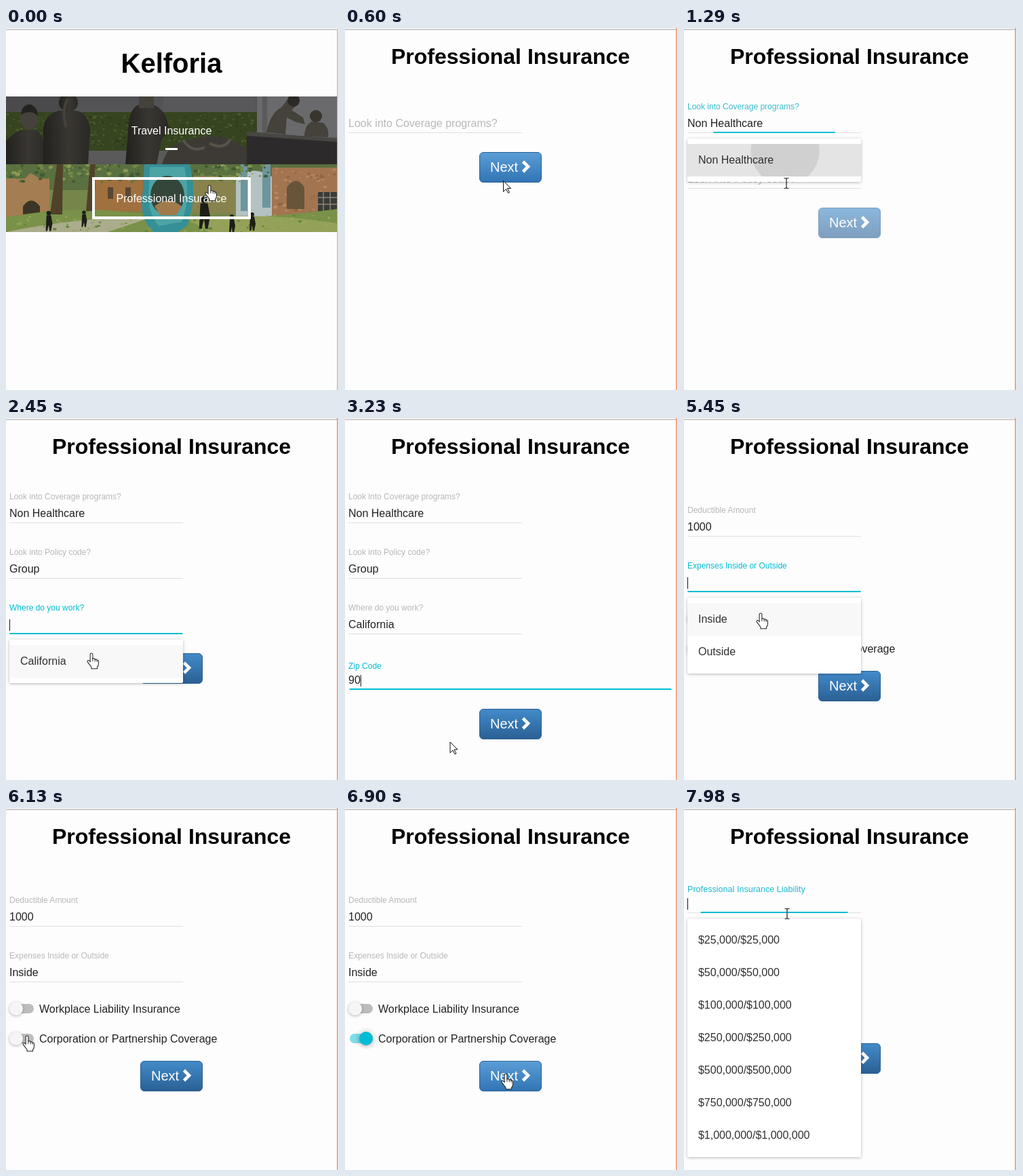
Animation of 491 by 534 pixels, one loop 8000 ms. Source, as an HTML page:

```html
<!DOCTYPE html>
<html lang="en">
<head>
<meta charset="utf-8">
<title>Insurance form</title>
<style>
html, body { margin: 0; width: 100%; height: 100%; overflow: hidden; background: #fdfdfd; }
svg { display: block; width: 491px; height: 534px; font-family: "Liberation Sans", Arial, sans-serif; }
text { white-space: pre; }
.menu { filter: drop-shadow(0 1px 2px rgba(0, 0, 0, .28)); }
.thumb { filter: drop-shadow(0 1px 2px rgba(0, 0, 0, .3)); }
</style>
</head>
<body>
<svg viewBox="0 0 491 534">
  <defs>
    <linearGradient id="normal" x2="0" y2="1"><stop stop-color="#428bca"/><stop offset="1" stop-color="#2a6094"/></linearGradient>
    <linearGradient id="hover" x2="0" y2="1"><stop stop-color="#5b9dd6"/><stop offset="1" stop-color="#3174b4"/></linearGradient>
    <linearGradient id="wall" x2="0" y2="1"><stop stop-color="#515154"/><stop offset="1" stop-color="#616060"/></linearGradient>
    <linearGradient id="bronze"><stop stop-color="#22211f"/><stop offset=".55" stop-color="#3a3732"/><stop offset="1" stop-color="#292825"/></linearGradient>
    <clipPath id="upper"><rect y="101" width="488" height="100"/></clipPath>
    <clipPath id="lower"><rect y="201" width="488" height="100"/></clipPath>
  </defs>
  <g id="home"></g>
  <g id="live"></g>
</svg>
<script>
const LOOP = 8000, CYAN = [0, 188, 212], GREY = [184, 184, 184];
const home = document.getElementById('home'), live = document.getElementById('live');

const clamp = v => Math.max(0, Math.min(1, v));
const ease = p => 1 - (1 - clamp(p)) ** 5;
const mix = (a, b, p) => `rgb(${a.map((v, i) => Math.round(v + (b[i] - v) * p))})`;

const rect = (x, y, w, h, fill, more = '') =>
  `<rect x="${x}" y="${y}" width="${w}" height="${h}" fill="${fill}" ${more}/>`;
const circle = (x, y, r, fill, more = '') => `<circle cx="${x}" cy="${y}" r="${r}" fill="${fill}" ${more}/>`;
const path = (d, fill, more = '') => `<path d="${d}" fill="${fill}" ${more}/>`;
const text = (x, y, s, size = 16, fill = '#222', more = '') =>
  `<text x="${x}" y="${y}" font-size="${size}" fill="${fill}" ${more}>${s}</text>`;
const centred = (y, s, size, fill, more = '') => text(244, y, s, size, fill, 'text-anchor="middle" ' + more);

let seed = 11;
const random = () => (seed = seed * 16807 % 2147483647) / 2147483647;
function speckle(count, x, y, w, h, colours, size) {
  let out = '';
  for (let i = 0; i < count; i++) {
    const r = size * (.4 + random());
    out += `<ellipse cx="${(x + random() * w).toFixed(1)}" cy="${(y + random() * h).toFixed(1)}" rx="${r.toFixed(1)}" ry="${(r * .7).toFixed(1)}" fill="${colours[i % colours.length]}"/>`;
  }
  return out;
}

function statues() {
  const bronze = 'url(#bronze)', lit = '#45413b';
  return '<g clip-path="url(#upper)">' +
    rect(0, 101, 488, 100, 'url(#wall)') + rect(0, 101, 82, 24, '#4a4a4d') +
    rect(82, 101, 9, 26, '#626265') + rect(232, 101, 136, 26, '#58585b') +
    rect(370, 101, 118, 60, '#6a6a6c') + rect(378, 101, 7, 60, '#5a5a5c') +
    rect(0, 124, 370, 57, '#364520') +
    speckle(420, 0, 127, 368, 52, ['#41532a', '#2e3c1c', '#4a5d2e'], 1.9) +
    rect(0, 181, 360, 20, '#5b5a5b') +
    path('M0 201V166Q12 155 20 151L45 150Q58 160 60 201Z', bronze) +
    `<ellipse cx="34" cy="132" rx="13" ry="18" fill="${lit}"/>` +
    path('M22 128Q24 111 37 113Q47 118 47 130Q38 119 22 128Z', '#242321') +
    path('M55 201V146Q59 127 78 122H104Q122 127 124 150L121 201Z', bronze) + circle(92, 110, 14, bronze) +
    path('M91 105Q81 123 89 146', 'none', `stroke="${lit}" stroke-width="4"`) +
    path('M176 201L181 140Q184 116 197 113H217Q238 122 240 149L229 166L222 201Z', bronze) +
    rect(196, 98, 22, 20, lit) +
    path('M230 201Q240 166 275 164Q310 151 348 173Q369 184 373 201Z', '#3d3a35') +
    path('M261 165Q274 185 293 176M300 170Q321 181 331 164', 'none', 'stroke="#57524a" stroke-width="4"') +
    path('M355 201V153L488 164V201Z', '#2c2a2a') + path('M355 153L488 163V168L355 159Z', '#484643') +
    path('M384 154Q390 125 406 117L417 103 430 101 432 111 421 121 438 132 441 142 428 139 414 132 412 157Z', lit) +
    circle(424, 107, 9, '#2c2a27') +
    path('M440 160Q440 143 451 138L468 140Q477 148 475 161Z', lit) + circle(457, 130, 9, '#38352f') + '</g>';
}

function campus() {
  const person = (x, y, s) => circle(x, y, 3 * s, '#1d1e16') +
    path(`M${x - 3 * s} ${y + 3 * s}h${6 * s}l${2 * s} ${11 * s}-${2 * s} ${10 * s}h-${2 * s}l-${s}-${8 * s}-${2 * s} ${8 * s}h-${2 * s}Z`, '#1d1e16');
  return '<g clip-path="url(#lower)">' + rect(0, 201, 488, 100, '#75864a') +
    rect(0, 201, 488, 38, '#5a7040') +
    path('M0 222H28L36 214 50 222H64V279H0Z', '#a57d52') +
    path('M25 279V263Q37 246 50 263V279Z', '#3a3526') +
    rect(132, 224, 70, 47, '#a0703f') + rect(150, 235, 8, 17, '#5a4632') + rect(176, 235, 8, 17, '#5a4632') +
    rect(270, 218, 70, 55, '#88834d') +
    path('M339 301V222Q364 199 396 222V275Z', '#b4c2c2') + path('M346 201H356V270H346ZM378 201H390V265H378Z', '#6d959f') +
    rect(392, 206, 96, 72, '#a37450') +
    speckle(65, 395, 206, 92, 65, ['#af8159', '#93653f', '#b58c62'], 2.4) +
    path('M414 267V235Q428 216 440 235V267Z', '#68543b') + rect(460, 242, 28, 34, '#3a3a36') +
    path('M460 250H488M460 260H488M468 242V276M478 242V276', 'none', 'stroke="#8d8776" stroke-width="1.5"') +
    speckle(200, 0, 201, 390, 26, ['#718a45', '#425b35', '#8a9852', '#5d763c'], 2.8) +
    path('M0 279Q110 259 205 275T488 267V301H0Z', '#799148') +
    path('M0 301Q75 285 170 279H215L150 301Z', '#aaac8b') + path('M268 282Q375 270 488 288V301H300Z', '#94a259') +
    speckle(140, 0, 276, 488, 25, ['#8a9f51', '#64823d', '#99a65c'], 2) +
    path('M65 275L75 201H84L83 275ZM118 270L124 201H132L127 270Z', '#4f4229') +
    path('M204 201H271Q283 247 267 292L253 301H218Q195 282 202 239Z', '#358f96') +
    path('M212 205H263Q273 250 259 286L225 292Q207 271 211 236Z', '#4da4a5') +
    '<ellipse cx="238" cy="247" rx="25" ry="29" fill="#34463a"/>' +
    path('M219 263Q238 246 259 263L251 276H227Z', '#a17a4b') +
    person(63, 273, 1.1) + person(115, 272, .9) + person(292, 253, 1.8) + person(333, 278, 1) + person(363, 275, 1) + '</g>';
}

home.innerHTML = centred(66, 'Kelforia', 40, '#000', 'font-weight="bold"') + statues() + campus() +
  centred(157, 'Travel Insurance', 16, '#fff') + rect(235, 177, 18, 3, '#fff') +
  rect(129, 222, 230, 58, 'none', 'stroke="#fff" stroke-width="4"') +
  centred(257, 'Professional Insurance', 16, '#fff');

const money = n => '$' + n.toLocaleString('en-US');
const limits = [25, 50, 100, 250, 500, 750, 1000].map(k => money(k * 1000) + '/' + money(k * 1000));

// Times in ms; y is the underline of the field.
const pages = [
  { from: 600, to: 4320, fields: [
    { y: 154, label: 'Look into Coverage programs?', show: 0, focus: 800, pick: 1200, options: ['Non Healthcare'] },
    { y: 236, label: 'Look into Policy code?', show: 1260, focus: 1500, pick: 2000, options: ['Group', 'Individual'] },
    { y: 318, label: 'Where do you work?', show: 2060, focus: 2150, pick: 2560, options: ['California'] },
    { y: 400, label: 'Zip Code', show: 2840, focus: 2950, width: 478, drop: 4, typed: '90001', keys: [3110, 3220, 3390, 3540, 3770] }
  ] },
  { from: 4490, to: 7200, button: 373, fields: [
    { y: 174, label: 'Deductible Amount', focus: 4680, pick: 4940, options: ['1000', '2500', '5000', '7500', '10000', '15000', '20000'] },
    { y: 256, label: 'Expenses Inside or Outside', focus: 5140, pick: 5540, options: ['Inside', 'Outside'] }
  ], toggles: [
    { y: 296, label: 'Workplace Liability Insurance' },
    { y: 340, label: 'Corporation or Partnership Coverage', on: 6250 }
  ] },
  { from: 7290, to: LOOP, fields: [
    { y: 154, label: 'Professional Insurance Liability', focus: 7840, options: limits },
    { y: 236, label: 'Effective Date' },
    { y: 318, label: 'Retroactive Date' }
  ] }
];
const busy = [[1250, 1420], [2050, 2200], [2690, 2840]];

const pointer = [
  [0, 300, 232, 'hand'], [200, 300, 232, 'hand'], [300, 258, 250, 'hand'], [530, 258, 250, 'arrow'],
  [760, 150, 142, 'ibeam'], [1000, 150, 142, 'ibeam'], [1140, 149, 181, 'hand'], [1210, 149, 181, 'hand'],
  [1290, 151, 229, 'ibeam'], [1600, 151, 229, 'hand'], [1850, 140, 268, 'hand'], [2040, 140, 268, 'hand'],
  [2140, 139, 303, 'ibeam'], [2270, 139, 303, 'hand'], [2450, 126, 347, 'hand'], [2620, 126, 347, 'hand'],
  [2770, 140, 345, 'arrow'], [2840, 140, 345, 'arrow'], [2940, 150, 386, 'ibeam'], [3050, 150, 386, 'arrow'],
  [3230, 155, 478, 'arrow'], [4050, 155, 478, 'arrow'], [4220, 234, 466, 'hand'], [4330, 234, 466, 'arrow'],
  [4490, 215, 400, 'arrow'], [4660, 140, 162, 'ibeam'], [4720, 140, 162, 'hand'], [4900, 121, 204, 'hand'],
  [5000, 121, 204, 'hand'], [5130, 118, 246, 'ibeam'], [5290, 118, 246, 'hand'], [5430, 113, 288, 'hand'],
  [5760, 113, 288, 'hand'], [6130, 31, 336, 'hand'], [6600, 31, 336, 'hand'], [6860, 237, 392, 'hand'],
  [7140, 237, 392, 'arrow'], [7370, 163, 222, 'ibeam'], [7440, 163, 222, 'ibeam'], [7680, 152, 161, 'ibeam'],
  [7850, 152, 161, 'ibeam'], [7920, 152, 156, 'ibeam']
];
const shapes = {
  hand: '<g transform="translate(0 .5) scale(.95)">' +
    path('M-2 1.5Q-2-.5 0-.5T2 1.5V8Q5 7 5.5 9Q8 8.3 8.6 10Q11 9.6 11 12V16Q11 19 9 21V23.5H0V21Q-3 17-6 13Q-7 11-5 10.5Q-4 10-2 12.5Z',
      '#fff', 'stroke="#222" stroke-width="1.1"') + path('M2 7V12M5.5 9V12.5M8.6 10V13', 'none', 'stroke="#222"') + '</g>',
  ibeam: path('M-3.5-7.5h2.5l1 1 1-1h2.5M0-6.5V6.5M-3.5 7.5h2.5l1-1 1 1h2.5', 'none', 'stroke="#222" stroke-width="1.2"'),
  arrow: path('M0 0V16l4-4 3 6 2-1-3-6h5Z', '#fff', 'stroke="#111"')
};

function pointerAt(t) {
  const i = pointer.findLastIndex(k => k[0] <= t);
  const a = pointer[i], b = pointer[i + 1] || a;
  const p = b === a ? 0 : (t - a[0]) / (b[0] - a[0]);
  const s = p * p * (3 - 2 * p);
  return { x: a[1] + (b[1] - a[1]) * s, y: a[2] + (b[2] - a[2]) * s, kind: p > .6 ? b[3] : a[3] };
}

function drawField(f, t) {
  const { y, width = 256, drop = 0, focus = Infinity, pick = Infinity } = f;
  const blur = pick + 60;
  const raised = ease((t - focus) / 450), lost = ease((t - blur) / 450);
  const active = raised * (1 - lost);
  const value = f.keys ? f.typed.slice(0, f.keys.filter(k => k <= t).length) : t >= blur ? f.options[0] : '';
  let out = rect(5, y, width, 1, '#e0e0e0');
  if (active > .005) out += rect(5 + width * (1 - active) / 2, y - 1, width * active, 2, `rgb(${CYAN})`);
  out += text(5, y - 8 - (26 - drop) * raised, f.label, 16 - 4 * raised, mix(GREY, CYAN, active));
  out += text(5, y - 8, value);
  const typing = f.keys ? t < 3900 : t < blur;
  if (t >= focus && typing) out += rect(5 + value.length * 8.9, y - 21, 1, 17, '#111');
  return out;
}

function drawMenu(f, t, mouse) {
  const { focus, pick = Infinity, options } = f;
  const opened = ease((t - focus) / 150), closing = clamp((t - pick - 180) / 150);
  if (!options || t < focus || closing === 1) return '';
  const top = f.y + 9, height = 16 + 48 * options.length;
  let out = rect(5, top, 256, height, '#fff', 'class="menu" rx="2"');
  options.forEach((option, i) => {
    const y = top + 8 + 48 * i;
    const chosen = i === 0 && t >= pick;
    const over = mouse.kind === 'hand' && mouse.y >= y && mouse.y < y + 48;
    if (chosen || over) out += rect(5, y, 256, 48, chosen ? '#e4e4e4' : '#f8f8f8');
    if (chosen) {
      const age = t - pick;
      out += `<clipPath id="item"><rect x="5" y="${y}" width="256" height="48"/></clipPath>` +
        circle(149, y + 10, age * 50 / 90, '#000', `opacity="${.09 * (1 - clamp((age - 100) / 300))}" clip-path="url(#item)"`);
    }
    out += text(21, y + 29, option, 16, '#303030');
  });
  return `<g opacity="${opened * (1 - closing)}" transform="translate(0 ${top}) scale(1 ${opened}) translate(0 ${-top})">${out}</g>`;
}

function drawToggle(g, t) {
  const on = g.on ? ease((t - g.on) / 450) : 0;
  const x = 15 + 16 * on;
  return rect(7, g.y - 7, 34, 14, mix([189, 189, 189], [127, 221, 233], on), 'rx="7"') +
    (on ? circle(x, g.y, 16, '#000', 'opacity=".035"') : '') +
    circle(x, g.y, 10, mix([245, 245, 245], CYAN, on), 'class="thumb"') +
    text(49, g.y + 6, g.label);
}

function drawButton(y, t, mouse) {
  const over = mouse.x > 198 && mouse.x < 290 && mouse.y > y && mouse.y < y + 45;
  const waiting = busy.some(([a, b]) => t >= a && t < b);
  return `<g opacity="${waiting ? .6 : 1}">` +
    rect(198.5, y + .5, 91, 44, `url(#${over ? 'hover' : 'normal'})`, 'rx="5.5" stroke="#2b5f8f"') +
    text(214, y + 28.5, 'Next', 20, '#fff') +
    path(`M262.5 ${y + 14}l7.5 7.5-7.5 7.5`, 'none', 'stroke="#fff" stroke-width="4.6"') + '</g>';
}

function drawPage(page, t, mouse) {
  const fields = page.fields.filter(f => t >= (f.show || 0));
  const bottom = page.button || fields[fields.length - 1].y + 29;
  return fields.map(f => drawField(f, t)).join('') +
    (page.toggles || []).map(g => drawToggle(g, t)).join('') +
    drawButton(bottom, t, mouse) +
    fields.map(f => drawMenu(f, t, mouse)).join('');
}

function draw(t) {
  const mouse = pointerAt(t), atHome = t < 530, framed = t >= 200;
  const page = pages.find(p => t >= p.from && t < p.to);
  home.style.display = atHome ? '' : 'none';
  live.innerHTML =
    (atHome ? '' : centred(53, 'Professional Insurance', 32, '#000', 'font-weight="bold"')) +
    (page ? drawPage(page, t, mouse) : '') +
    rect(0, 0, 491, 2, '#eeeeee') + rect(0, 2, 489, 1, '#b5b1b5') +
    rect(488, framed ? 0 : 2, 1, 534, framed ? '#f4763b' : '#b5b1b5') +
    rect(489, 0, 2, 534, '#e4e4e4') +
    `<g transform="translate(${mouse.x.toFixed(1)} ${mouse.y.toFixed(1)})">${shapes[mouse.kind]}</g>`;
}

const start = performance.now();
function tick() {
  draw((performance.now() - start) % LOOP);
  requestAnimationFrame(tick);
}
tick();
</script>
</body>
</html>
```
